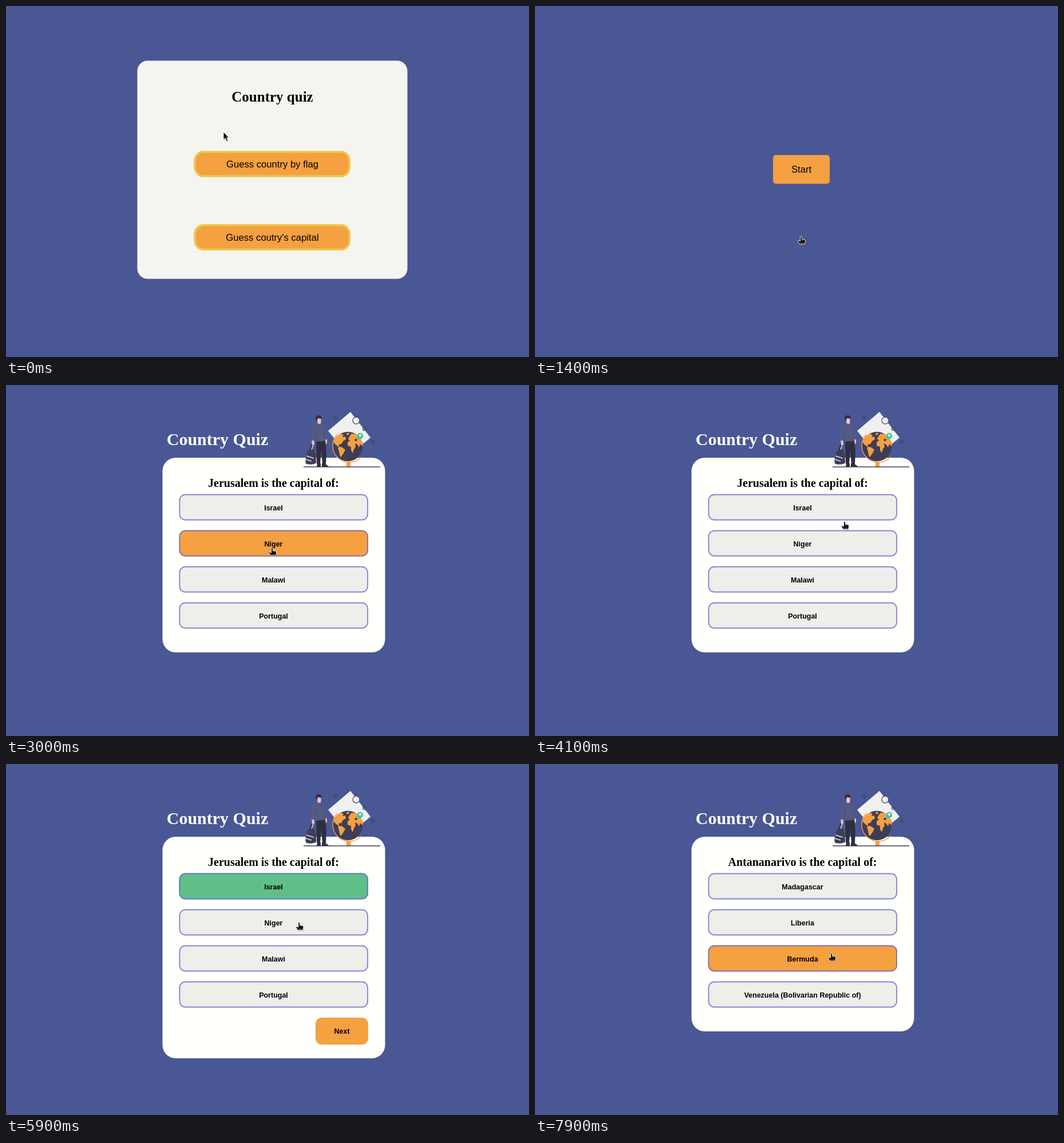
An HTML page for the animation above (8000 ms loop, 914x613 px).

```html
<!DOCTYPE html>
<html lang="en">
<head>
<meta charset="utf-8">
<title>Country quiz</title>
<style>
html, body { margin: 0; width: 100%; height: 100%; overflow: hidden; background: #495794; }
svg { display: block; width: 914px; height: 613px; }
text { font-family: "Liberation Sans", Arial, sans-serif; text-anchor: middle; }
.serif { font-family: "Liberation Serif", "Times New Roman", serif; font-weight: bold; }
.menu { font-size: 16.67px; }
.option { font-size: 12.5px; font-weight: bold; }
</style>
</head>
<body>
<svg id="stage" viewBox="0 0 914 613"></svg>
<script>
const LOOP = 8000, STEP = 100;
const ORANGE = '#f5a041', YELLOW = '#efc94c', DARK = '#3f3d56', INK = '#2f2e41', SKIN = '#fbbebe';
const stage = document.getElementById('stage');

// pointer path: time, x, y
const PATH = [
  [0, 380, 220], [100, 405, 262], [200, 405, 262], [400, 425, 290], [900, 465, 402], [1600, 465, 402],
  [1900, 465, 325], [2000, 465, 325], [2600, 465, 284], [3600, 465, 284], [3900, 525, 262],
  [4000, 538, 246], [4100, 541, 238], [4400, 530, 225], [4700, 548, 243], [4900, 557, 249],
  [5000, 560, 262], [5300, 495, 226], [5500, 495, 226], [5700, 493, 221], [5800, 493, 221],
  [6200, 570, 442], [6600, 570, 442], [6700, 572, 420], [6900, 575, 400], [7200, 545, 300],
  [7300, 545, 300], [7500, 535, 240], [7700, 523, 320], [7900, 518, 330]
];

const MENU = [['Guess country by flag', 253], ["Guess coutry's capital", 381]];
const ROUNDS = [
  ['Jerusalem', 'Israel', 'Niger', 'Malawi', 'Portugal'],
  ['Antananarivo', 'Madagascar', 'Liberia', 'Bermuda', 'Venezuela (Bolivarian Republic of)']
];

function pointer(t) {
  const i = PATH.findIndex(k => k[0] >= t);
  if (i < 0) return PATH[PATH.length - 1].slice(1);
  if (i === 0) return PATH[0].slice(1);
  const [t0, x0, y0] = PATH[i - 1], [t1, x1, y1] = PATH[i];
  const p = (t - t0) / (t1 - t0);
  return [x0 + (x1 - x0) * p, y0 + (y1 - y0) * p];
}

const inside = ([px, py], x, y, w, h) => px >= x && px <= x + w && py >= y && py <= y + h;

const label = (s, x, y, cls, extra = '') => `<text class="${cls}" x="${x}" y="${y}" ${extra}>${s}</text>`;

function box(x, y, w, h, r, fill, stroke, sw = 0) {
  const base = `<rect x="${x}" y="${y}" width="${w}" height="${h}" rx="${r}" fill="${fill}"/>`;
  return stroke ? base + `<rect x="${x + sw / 2}" y="${y + sw / 2}" width="${w - sw}" height="${h - sw}" rx="${r - sw / 2}" fill="none" stroke="${stroke}" stroke-width="${sw}"/>` : base;
}

const shape = (d, fill) => `<path d="${d}" fill="${fill}"/>`;
const ring = (x, y, r, stroke, sw, fill = 'none') =>
  `<circle cx="${x}" cy="${y}" r="${r}" fill="${fill}" stroke="${stroke}" stroke-width="${sw}"/>`;

const TRAVELLER = [
  // map sheet
  shape('M602 47L637 92L598 124L563 80Z', '#f0f0f0'),
  ring(612, 62, 6, '#495794', 1.4, '#f0f0f0'),
  ring(575, 57, 2.5, DARK, 1.2), ring(626, 77, 2.5, DARK, 1.2), ring(641, 99, 2.5, DARK, 1.2),
  // globe
  shape('M595 134h7l.5 9h-8z', ORANGE),
  ring(597.5, 107.5, 25.8, 'none', 0, DARK),
  '<path d="M579 86A28.5 28.5 0 1 0 621 126" fill="none" stroke="#f5a041" stroke-width="1.4"/>',
  shape('M573 97Q577 88 585 85L590 87L588 91L593 90L594 95L589 98L586 103L581 104L583 109L577 105L573 101Z', ORANGE),
  shape('M580 109L586 108L593 113L590 119L585 126L583 122L582 116Z', ORANGE),
  shape('M600 90L604 85L612 86L619 92L624 101L623 107L619 103L617 109L614 104L610 102L611 108L608 112L606 119L603 114L603 108L597 106L597 100L601 97L598 94Z', ORANGE),
  shape('M595 85L599 83L600 86L596 88Z', ORANGE),
  shape('M614 96L614 90A5.2 5.2 0 1 1 620 94Z', '#3fc79a'),
  ring(619, 88, 2.3, 'none', 0, '#f0f0f0'), ring(611.5, 96, 2, 'none', 0, INK),
  // backpack
  shape('M527 116Q531 110 537 112Q542 117 542 136Q537 140 525 138Q521 134 527 116Z', DARK),
  '<path d="M525 124l13 4M524 130l10 3M534 113L537 104" stroke="#d9d9e3" stroke-width="1.6"/>',
  '<path d="M532 113Q533 106 536 104" fill="none" stroke="#2f2e41" stroke-width="2"/>',
  // figure
  shape('M534 95h4l1 8q-2 5-4 1z', SKIN), shape('M557 93h4v8q-2 4-4 0z', SKIN),
  shape('M542 97L558 96L560 117L559 138L553 138L551 113L549 138L543 138Z', INK),
  shape('M543 143q0-5 3-6h4v6zM552 143v-6h5l7 5v1z', INK),
  shape('M544 57h6.5v8q-1 4-3 5h-3z', SKIN),
  shape('M541.5 60Q540 53 547 53Q553 53 551 59L545 58L544 62Z', INK),
  shape('M541 66L551 69Q557 72 558 78L561 95L557 96L555 88L557 98L541 99L541 86L538 97L534 97L534 75Q535 68 541 66Z', '#535a83'),
  '<path d="M541 78v12M555 80l1 10" stroke="#454b73"/>',
  `<path d="M520 143H654" stroke="${DARK}" stroke-width="1.4"/>`
].join('');

function menu(at) {
  return box(229.5, 95.5, 472, 381, 18, '#f4f5f1') +
    label('Country quiz', 465.5, 167, 'serif', 'font-size="25"') +
    MENU.map(([s, y]) => box(328.5, y, 273.5, 46, 17, inside(at, 328.5, y, 273.5, 46) ? YELLOW : ORANGE, YELLOW, 3.6) +
      label(s, 465.5, y + 28.7, 'menu')).join('');
}

function start(focused) {
  return (focused ? box(413.5, 257.8, 104, 55.2, 4, '#fff') + box(414.7, 259, 101.6, 52.8, 4, '#101010') : '') +
    box(416, 260.3, 99, 50.2, 5, ORANGE) + label('Start', 465.5, 291, 'menu');
}

function quiz(t, at) {
  const loading = t < 3000, answered = t >= 5300 && t < 6300;
  const [city, ...names] = ROUNDS[t < 6300 ? 0 : 1];
  const drop = loading ? 7 : 0, height = loading ? 29 : 46;
  let s = box(273.5, 127, 389, loading ? 272 : answered ? 387 : 340, 23, '#fffffc') +
    label('Country Quiz', 369.5, 105, 'serif', 'font-size="30" fill="#fffffc"') + TRAVELLER +
    label((loading ? '' : city) + ' is the capital of:', 467.5, 178, 'serif', 'font-size="20"');
  names.forEach((name, i) => {
    const y = 190.5 + i * (height + 17);
    const over = !loading && !answered && inside(at, 302.5, y, 330.5, height);
    const fill = answered && i === 0 ? '#60bf88' : over ? ORANGE : '#eeeeea';
    s += box(302.5, y, 330.5, height, 11, fill, 'rgba(96,102,208,.75)', 1.9);
    if (!loading) s += label(name, 467.5, y + 28.2, 'option');
  });
  if (answered) s += box(541, 443, 92, 47, 11, ORANGE) + label('Next', 587, 471, 'option');
  return `<g transform="translate(0 ${drop})">${s}</g>`;
}

function onButton(t, at) {
  if (t < 1400) return MENU.some(([, y]) => inside(at, 328.5, y, 273.5, 46));
  if (t < 3000) return true;
  return [0, 1, 2, 3].some(i => inside(at, 302.5, 190.5 + 63 * i, 330.5, 46)) ||
    (t >= 5300 && t < 6400 && inside(at, 541, 441, 92, 49));
}

function cursor([x, y], hand) {
  const d = hand
    ? 'M-1.5 1Q0-.8 1.2 1V5L6 6Q8 6.5 7.5 9L6.5 14H-2.5L-5.5 9Q-5.5 6.5-3 8L-1.5 9Z'
    : 'M0 0V13.5L3 10.8L5.4 16L7.8 15L5.5 10H9.5Z';
  const fingers = hand ? '<path d="M1.7 6v2.3M4 6.4v2M-1.5 12h7" stroke="#bbb" stroke-width=".7"/>' : '';
  return `<g transform="translate(${x} ${y})"><path d="${d}" transform="translate(1 1.2)" fill="#000" opacity=".2"/>` +
    `<path d="${d}" fill="#080808" stroke="#fff" stroke-width=".9" stroke-linejoin="round"/>${fingers}</g>`;
}

function draw(t) {
  // the page reacts a little after the pointer moves
  const lag = t < 1400 ? 0 : STEP;
  const seen = pointer(t - lag);
  const screen = t < 1400 ? menu(seen) : t < 2800 ? start(t >= 2600) : quiz(t, seen);
  stage.innerHTML = screen + cursor(pointer(t), onButton(t, pointer(t - 2 * lag)));
}

let shown = -1;
const begin = performance.now();
function tick() {
  const t = Math.floor((performance.now() - begin) % LOOP / STEP) * STEP;
  if (t !== shown) draw(shown = t);
  requestAnimationFrame(tick);
}
tick();
</script>
</body>
</html>
```
